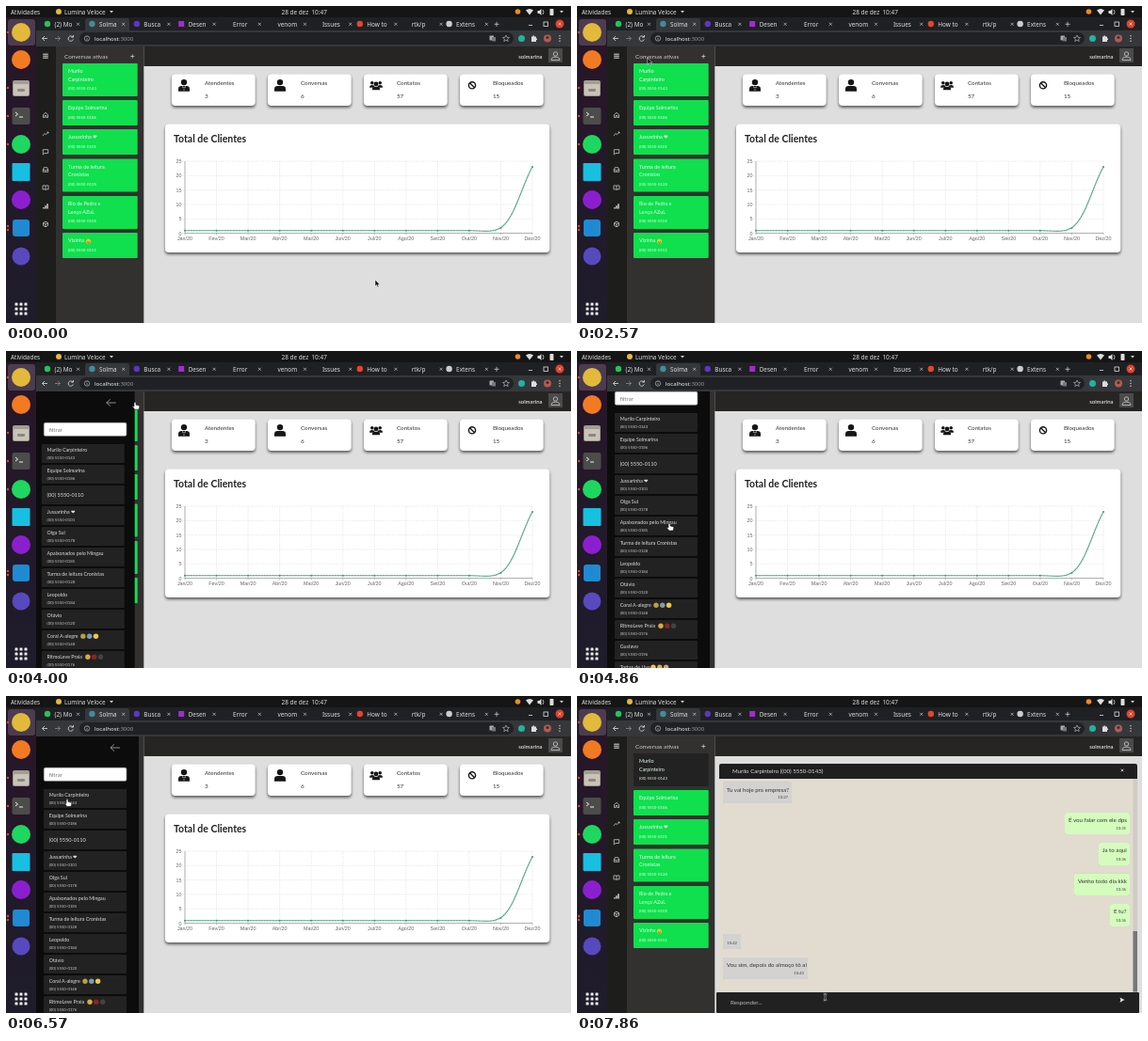
An HTML page for the animation above (8000 ms loop, 600 by 337 pixels).

```html
<!DOCTYPE html>
<html lang="pt-BR">
<head>
<meta charset="utf-8">
<style>
html, body { margin: 0; width: 100%; height: 100%; overflow: hidden; background: #dedede; }
#stage { display: block; width: 100vw; height: 100vh; }
text { font-family: Lato, sans-serif; white-space: pre; }
.sys { font-family: "Noto Sans", sans-serif; }
.axis { font-family: "Liberation Sans", sans-serif; }
.card { filter: drop-shadow(0 2.5px 1.8px #0009); }
</style>
</head>
<body>
<svg id="stage" viewBox="0 0 600 337"></svg>
<script>
const rect = (x, y, w, h, fill, r = 0, extra = '') =>
  `<rect x="${x}" y="${y}" width="${w}" height="${h}" rx="${r}" fill="${fill}" ${extra}/>`;
const dot = (x, y, r, fill) => `<circle cx="${x}" cy="${y}" r="${r}" fill="${fill}"/>`;
const text = (s, x, y, size, fill, extra = '') =>
  `<text x="${x}" y="${y}" font-size="${size}" fill="${fill}" ${extra}>${s}</text>`;
const sys = (s, x, y, size = 6.4, fill = '#ddd') => text(s, x, y, size, fill, 'class="sys"');
const line = (d, stroke, w = .8, extra = '') =>
  `<path d="${d}" fill="none" stroke="${stroke}" stroke-width="${w}" ${extra}/>`;
const shape = (d, fill, extra = '') => `<path d="${d}" fill="${fill}" ${extra}/>`;
const at = (x, y, body) => `<g transform="translate(${x} ${y})">${body}</g>`;
const group = (id, body) => `<g id="${id}">${body}</g>`;
const cross = (x, y, r, c) => line(`M${x - r} ${y - r}l${2 * r} ${2 * r}m0 ${-2 * r}l${-2 * r} ${2 * r}`, c, .7);
const phone = n => '(00) 5550-' + n;

const contacts = [
  ['Murilo Carpinteiro', '0143'], ['Equipe Solmarina', '0186'], ['', '0110'],
  ['Jussarinha ❤', '0101'], ['Olga Sul', '0178'], ['Apaixonados pelo Mingau', '0185'],
  ['Turma de leitura Cronistas', '0128'], ['Leopoldo', '0184'], ['Otávio', '0120'],
  ['Coral A-alegre', '0148', 81, '#b8a040', '#7f9bb0', '#f0c840'],
  ['RitmoLeve Praia', '0176', 86, '#d8ac38', '#8b2525', '#444'],
  ['Gustavo', '0196'], ['Tortas de Uva', '0132', 78, '#f0c840', '#e0b040', '#c8a878'],
  ['Helena', '0155'], ['Zuleica', '0162']
];
const chats = [
  [61, 35, '0143', 'Murilo', 'Carpinteiro'], [100, 27, '0186', 'Equipe Solmarina'],
  [131, 27, '0101', 'Jussarinha ❤'], [162.5, 35, '0128', 'Turma de leitura', 'Cronistas'],
  [202, 35, '0105', 'Rio de Pedra e', 'Lenço AZuL'], [241, 27, '0151', 'Vizinha']
];

function desktop() {
  let s = rect(0, 0, 600, 12, '#151515') + sys('Atividades', 5, 8.5) +
    dot(56, 6, 3, '#e2b93b') + sys('Lumina Veloce', 62, 8.5) + shape('M110 5h4l-2 2.5z', '#ccc') +
    sys('28 de dez  10:47', 292.5, 8.5) + dot(543.5, 6, 2.8, '#f08a24') +
    shape('M552 4.5q4-3 8 0l-4 5z', '#ddd') + shape('M564.5 5h2l2-2v7l-2-2h-2z', '#ddd') +
    line('M570 4q2 2.5 0 5', '#ddd') + rect(577.5, 3, 4, 7, '#ddd', .7) + shape('M588 5h4l-2 2.5z', '#ccc');
  s += `<linearGradient id="dock" x2="0" y2="1"><stop stop-color="#281628"/><stop offset="1" stop-color="#1e1c2b"/></linearGradient>` +
    rect(0, 12, 32, 325, 'url(#dock)') + rect(2, 14, 29, 28, '#4b3c50', 3) + dot(16, 28, 10, '#e2b93b') +
    dot(16, 57, 10, '#f27a22') + rect(7, 79, 18, 17, '#a29c92', 2) + rect(8, 83, 16, 12, '#c9c3b8', 1) +
    rect(12, 88, 8, 3, '#8d877d', 1) + rect(6.5, 108, 19, 18, '#4c4c4a', 2) +
    line('M10 113l2.5 2-2.5 2m4 1h4', '#eee', 1) + dot(16, 147, 10, '#1ed760') +
    rect(6.5, 167, 19, 19, '#17bfe0', 1) + dot(16, 206, 10, '#8b1fd0') + rect(7, 227, 18, 18, '#1f8ad2', 3) +
    dot(16, 266, 9.5, '#5849be');
  for (const y of [28, 87, 117, 147, 234, 238]) s += dot(2, y, 1.2, '#e0462b');
  for (let i = 0; i < 9; i++) s += rect(9.5 + i % 3 * 5, 315.5 + (i / 3 | 0) * 5, 3, 3, '#eee', .6);
  return s;
}

function browser() {
  const tabs = [['(2) Mo', '#25c35b'], ['Solma', '#3c8f9c'], ['Busca', '#5d36c4'], ['Desen', '#a32bd0'],
    ['Error'], ['venom'], ['Issues'], ['How to', '#e8442c'], ['rtk/p'], ['Extens', '#ccc']];
  let s = rect(32, 12, 568, 15, '#1f2023') + rect(84, 13, 47, 15, '#36373b', 3) + rect(32, 26, 568, 17, '#36373b');
  tabs.forEach(([name, color], i) => {
    const x = 44 + i * 47.4;
    if (color) s += i == 3 ? rect(x - 3, 16, 6, 6, color) : dot(x, 19, 3.2, color);
    s += sys(name, x + 7.5, 21.6) + cross(76.5 + i * 48.2, 19.3, 1.5, '#ccc');
  });
  s += line('M518.5 19.3h5m-2.5-2.5v5', '#ccc') + line('M555 20.5h4', '#ddd') +
    rect(571, 17, 4.5, 4.5, 'none', 0, 'stroke="#ddd" stroke-width=".8"') +
    dot(588, 19, 4.5, '#e0402a') + cross(588, 19, 1.5, '#fff');
  s += line('M44 34.5h-5.5m2.5-2.5l-2.5 2.5 2.5 2.5', '#ddd') + line('M52 34.5h5.5m-2.5-2.5l2.5 2.5-2.5 2.5', '#888') +
    line('M71 33a2.7 2.7 0 1 0 .4 2.4M71.5 31v2.2h-2.2', '#ddd') + rect(78, 28, 461, 13, '#202124', 6.5) +
    `<circle cx="86" cy="34.5" r="2.7" fill="none" stroke="#bbb" stroke-width=".7"/>` + line('M86 34v2m0-3.5v.7', '#bbb', .7) +
    sys('localhost<tspan fill="#999">:3000</tspan>', 94, 36.8, 6.1, '#eee');
  s += rect(513.5, 31.5, 4.5, 5, '#aaa', .5) + rect(516, 33, 4, 4.5, '#777', .5) +
    shape('M531 31l1 2.3 2.5.2-1.9 1.6.6 2.5-2.2-1.3-2.2 1.3.6-2.5-1.9-1.6 2.5-.2z', 'none', 'stroke="#ccc" stroke-width=".6"') +
    dot(547.5, 34.5, 3.5, '#20b3a0') + shape('M558 32.5h1.5v-1h1.5v1h2v2h1v1.5h-1v2h-5z', '#ddd') +
    dot(575, 34.5, 4, '#b35b50') + dot(575, 33.5, 1.5, '#333');
  return s + dot(588, 31.8, .7, '#ddd') + dot(588, 34.5, .7, '#ddd') + dot(588, 37.2, .7, '#ddd');
}

function sidebar() {
  const icons = [
    [116, 'M-2.5 2.5V-.5L0-2.7 2.5-.5V2.5H.8V.5H-.8V2.5z'], [136, 'M-3 2l2-2.5 1.5 1.2L3-2M1.5-2H3V-.5'],
    [155, 'M-2.7-2.3H2.7V1.5H-1L-2.7 3z'], [174, 'M-2.7 2.3V0l1-2.3H1.7l1 2.3V2.3zM-2.7.2H-1l.5 1h1l.5-1H2.7'],
    [193, 'M0-1.8Q-1.5-2.6-3-2V2q1.5-.5 3 .3 1.5-.8 3-.3V-2q-1.5-.6-3 .2zV2.3'],
    [213, 'M-2 2.5V1M0 2.5V-.7M2 2.5V-2.7'], [232, 'M0-2.8L2.5-1.4V1.4L0 2.8-2.5 1.4V-1.4zM-2.5-1.4L0 0 2.5-1.4M0 0V2.8']
  ];
  let s = rect(32, 43, 21, 294, '#1d1d1c') + rect(53, 43, 94, 294, '#323130') +
    line('M39.2 51.2h5.6m-5.6 2h5.6m-5.6 2h5.6', '#ddd', 1, 'id="menu"');
  icons.forEach(([y, d], i) => s += at(42, y, line(d, '#ddd', i == 5 ? 1.4 : .7)));
  s += text('Conversas ativas', 62, 56.3, 6.3, '#ccc') + line('M132.3 53.5h4m-2-2v4', '#ccc');
  chats.forEach(([y, h, n, ...names], i) => {
    s += rect(60, y, 79.7, h, '#10df4e', 1, `id="chat${i}"`);
    names.forEach((name, j) => s += text(name, 66, y + 10.2 + j * 8.5, 5.45, '#e8ffee'));
    s += text(phone(n), 66, y + h - 7, 4.3, '#e8ffee');
  });
  return s + dot(87.5, 250, 2.6, '#f0c030') + line('M86 250.7q1.5 2 3 0', '#743', .7);
}

function dashboard() {
  const person = dot(0, -3.2, 3.2, '#161616') + shape('M-6 6.5V4Q-6 .7-2.5.7H2.5Q6 .7 6 4V6.5z', '#161616');
  const small = dot(0, -1.6, 1.8, '#161616') + shape('M-2.7 3.5V2.5Q-2.7.8 0 .8T2.7 2.5V3.5z', '#161616');
  const icons = [
    person + shape('M-2 .7L0 6 2 .7 0 2.3z', '#fff') + shape('M0 1.5l1 1.5L0 6-1 3z', '#161616'),
    person,
    at(-4.2, -1, small) + at(4.2, -1, small) + dot(0, -1.4, 2.4, '#161616') + shape('M-4 5V3.5Q-4 1.5 0 1.5T4 3.5V5z', '#161616'),
    line('M-3.6 0a3.6 3.6 0 1 1 7.2 0a3.6 3.6 0 1 1-7.2 0M-2.5-2.5L2.5 2.5', '#161616', 1.4)
  ];
  const stats = [['Atendentes', 3], ['Conversas', 6], ['Contatos', 57], ['Bloqueados', 15]];
  let s = rect(146.3, 43, 454, 294, '#dedede');
  stats.forEach(([label, value], i) => s += at(i * 102, 0, rect(176, 72.5, 88.7, 33.5, '#fff', 4, 'class="card"') +
    at(189, 84.3, icons[i]) + text(label, 211, 84, 6.25, '#333') + text(value, 211, 98.3, 6.25, '#333')));

  s += rect(169, 125.5, 408.3, 136.5, '#fff', 4, 'class="card"') +
    text('Total de Clientes', 178, 144.7, 10.5, '#222', 'font-weight="bold"');
  for (let v = 0; v <= 25; v += 5) {
    const y = 241.5 - v * 3.06;
    s += line(`M187.5 ${y}H559`, '#ddd', .6, v ? 'stroke-dasharray="1.5 1"' : '') +
      text(v, 186.5, y + 2, 5.4, '#666', 'class="axis" text-anchor="end"');
  }
  let dots = '';
  'Jan Fev Mar Abr Mai Jun Jul Ago Set Out Nov Dez'.split(' ').forEach((month, i) => {
    const x = 190 + i * 369 / 11;
    s += line(`M${x} 165V241.5`, '#ddd', .6, 'stroke-dasharray="1.5 1"') + line(`M${x} 241.5v2`, '#888', .5) +
      text(month + '/20', x, 249.3, 5.4, '#666', 'class="axis" text-anchor="middle"');
    dots += dot(x, i < 10 ? 238.7 : i < 11 ? 236 : 171, 1, '#3f9f7c');
  });
  s += line('M190 165V241.5H559', '#888', .6);
  const curve = 'M190 238.7H492C503 238.7 516 241.5 525 236C540 227 548 190 559 171';
  return s + line(curve, '#57b992', 1.1) + line(curve, '#777', .5, 'stroke-dasharray="1.5 1.5"') + dots;
}

function conversation() {
  const messages = [
    [155, 91.5, 73, 22.5, 'Tu vai hoje pra empresa?', '10:27'], [518, 124, 69, 23, 'É vou falar com ele dps', '10:35'],
    [554, 156, 33, 24, 'Ja to aqui', '10:36'], [528, 188.5, 59, 23.5, 'Venho todo dia kkk', '10:36'],
    [566, 221, 21, 24, 'E tu?', '10:36'], [155, 253, 19, 16, '', '10:42'],
    [155, 278, 90, 23, 'Vou sim, depois do almoço tô ai', '10:43']
  ];
  let s = rect(148, 72, 449, 265, '#dedede') + rect(151, 72, 444, 20, '#1f1f1f', 2) + rect(151, 88, 444, 227, '#e1dccf') +
    text(`Murilo Carpinteiro (${phone('0143')})`, 165, 82.2, 6.1, '#ddd') + cross(579, 79, 1.3, '#fff');
  for (const [x, y, w, h, body, time] of messages)
    s += rect(x, y, w, h, x < 200 ? '#d3d2d1' : '#d4fcbd', 2.5, 'style="filter:drop-shadow(0 .5px .4px #0003)"') +
      text(body, x + 4, y + 10, 6.15, '#333') + text(time, x + w - 4, y + h - 5, 4.2, '#444', 'text-anchor="end"');
  return s + rect(590.5, 88, 4.5, 227, '#d0ccc2') + rect(590.5, 250, 4.5, 64.5, '#777') +
    rect(148, 315, 449, 22, '#212121', 1) + text('Responder...', 163, 328.2, 6.3, '#bbb') +
    shape('M576.5 320.5l5 2.6-5 2.6.8-2.6z', '#ddd');
}

function contactPanel() {
  let rows = '';
  contacts.forEach(([name, n, x, ...emoji], i) => {
    const y = 99 + i * 22;
    rows += rect(40, y, 88, 20, '#222', 1) + (name
      ? text(name, 45.7, y + 8.3, 5.3, '#ddd') + text(phone(n), 45.7, y + 16, 4.25, '#ccc')
      : text(phone(n), 45.7, y + 12.2, 5.6, '#ddd'));
    emoji.forEach((c, j) => rows += dot(x + 3 + j * 6.8, y + 6.3, 2.7, c));
  });
  return `<svg id="panel" x="32" y="43" height="294">` + at(-32, -43, rect(32, 43, 109, 294, '#0c0c0c') +
    group('list', group('back', line('M116.5 55H106.5m4-3.7L106.5 55l4 3.7', '#aaa', .8, 'transform="translate(4.5 0)"')) +
      rect(40.3, 76.3, 87.6, 14, '#fff', 1.5, 'stroke="#aaa" stroke-width=".6"') +
      text('filtrar', 45.5, 85.6, 6, '#777') + group('rows', rows))) + '</svg>';
}

const header = rect(146.3, 43, 454, 21, '#262523') + text('solmarina', 569.5, 56, 6, '#fff', 'text-anchor="end"') +
  rect(576, 45, 15, 15, '#4a4a4a') +
  line('M581.3 51a2.2 2.2 0 1 1 4.4 0a2.2 2.2 0 1 1-4.4 0M579 57.5q0-3.3 4.5-3.3t4.5 3.3z', '#ddd', .7);
const beam = 'M-1.7-3.5Q0-3.5 0-2.5Q0-3.5 1.7-3.5M0-2.5V2.5M-1.7 3.5Q0 3.5 0 2.5Q0 3.5 1.7 3.5';
const pointers = group('arrow', shape('M0 0V7l1.6-1.4 1.1 2.5 1.2-.5-1.1-2.4H5z', '#111', 'stroke="#fff" stroke-width=".5"')) +
  group('hand', shape('M-1 .6Q0-.6 1 .6V3l3.3.8Q5 4 4.7 5.5L4 8H-.2L-2.6 5Q-2.4 3.8-1 5z', '#fff', 'stroke="#111" stroke-width=".6"')) +
  group('beam', line(beam, '#fff', 1.5) + line(beam, '#111', .8));

const $ = id => document.getElementById(id);
$('stage').innerHTML = desktop() + browser() + sidebar() + dashboard() + header +
  group('conversation', conversation()) + contactPanel() + group('pointer', pointers);

// Keys are [tick, ...values], at seven ticks per second.
const path = [[1, 392, 291], [3, 380, 274], [4, 380, 274], [8, 140, 118], [10, 140, 118], [13, 42, 54.5], [16, 42, 54.5],
  [21, 124, 56], [23, 132, 54], [24, 138, 52], [26, 137, 53.5], [29, 137, 54.5], [32, 104, 168], [34, 98, 183],
  [39, 96, 180], [45, 66, 112], [46, 65, 109.5], [50, 68, 112], [52, 110, 160], [55, 263.5, 320]];
const panelWidth = [[25, 0], [26, 42], [27, 86], [28, 104.7], [29, 109], [47, 109], [48, 70], [49, 22], [50, 0]];
const scrollTop = [[32, 0], [34, 33], [36, 80], [38, 80], [42, 0]];

function sample(keys, k) {
  const next = keys.findIndex(key => key[0] > k);
  if (next < 0) return keys[keys.length - 1].slice(1);
  if (!next) return keys[0].slice(1);
  const a = keys[next - 1], b = keys[next], f = (k - a[0]) / (b[0] - a[0]);
  return a.slice(1).map((v, i) => v + (b[i + 1] - v) * f);
}
const move = (id, x, y) => $(id).setAttribute('transform', `translate(${x} ${y})`);
const show = (id, on) => $(id).setAttribute('display', on ? 'inline' : 'none');

function render(now) {
  const k = Math.min(55, Math.floor((now % 8000 + 5) * 7 / 1000));
  const [x, y] = sample(path, k), [w] = sample(panelWidth, k), [scroll] = sample(scrollTop, k);
  const kind = k > 53 ? 'beam' : k < 13 || (k > 15 && k < 23) || k > 50 ? 'arrow' : 'hand';
  move('pointer', x, y);
  for (const id of ['arrow', 'hand', 'beam']) show(id, id == kind);
  $('panel').setAttribute('width', w);
  move('list', 0, -scroll);
  move('back', w - 109, 0);
  move('rows', (w - 109) / 2, 0);
  show('conversation', k > 48);
  $('chat0').setAttribute('fill', k > 48 ? '#222' : '#10df4e');
  $('menu').setAttribute('stroke', k > 12 && k < 16 ? '#6f8fd0' : '#ddd');
  requestAnimationFrame(render);
}
requestAnimationFrame(render);
</script>
</body>
</html>
```
